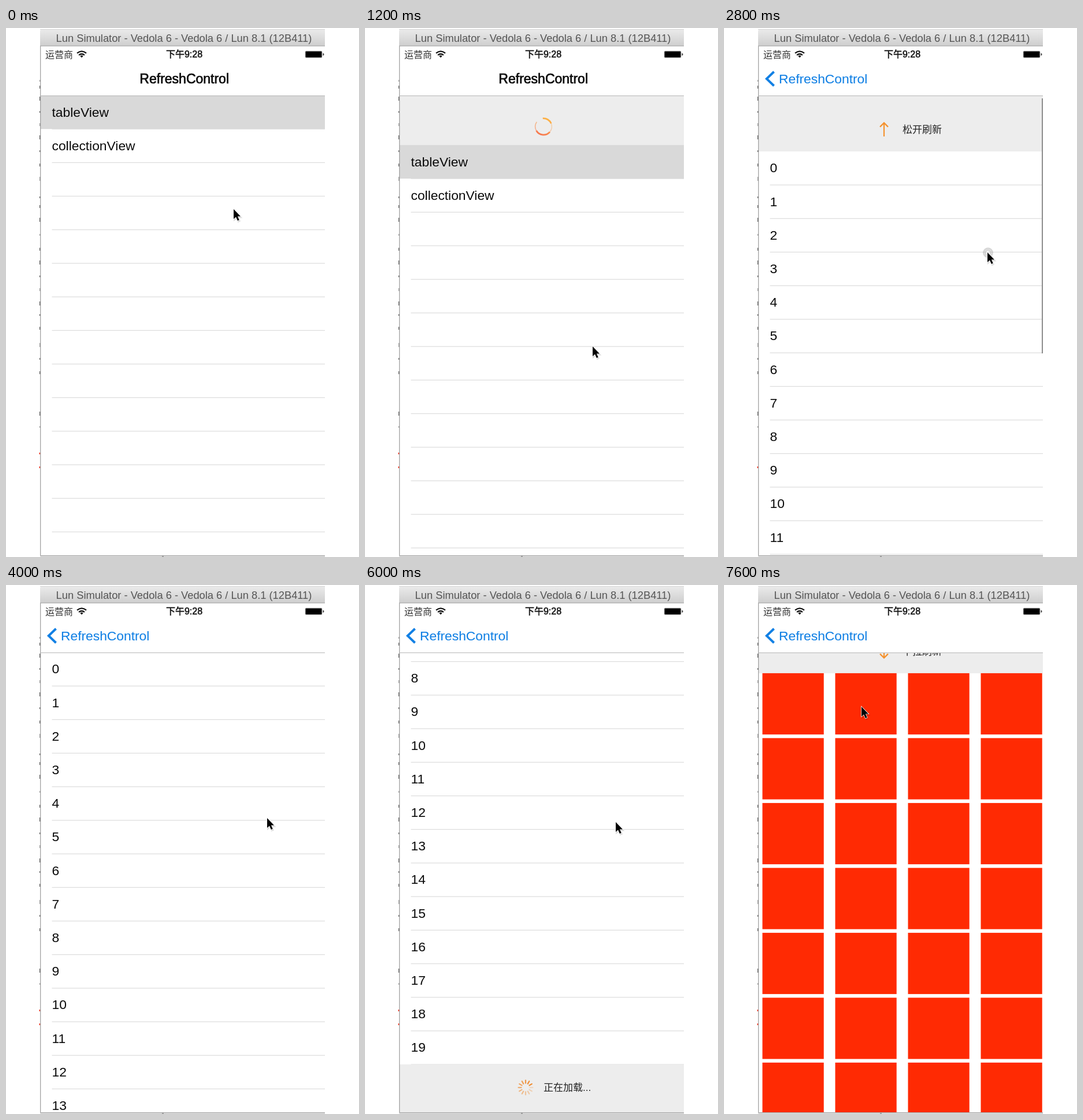
Animation of 611x917 px, one loop 8000 ms. Source, as an HTML page:

```html
<!DOCTYPE html>
<html lang="zh">
<head>
<meta charset="utf-8">
<title>RefreshControl</title>
<style>
html, body { margin: 0; width: 100%; height: 100%; overflow: hidden; background: #fff; }
svg { display: block; width: 100vw; height: 100vh; }
text { font-family: "Liberation Sans", "Noto Sans CJK SC", "Noto Sans CJK", sans-serif; white-space: pre; }
.cell { font-size: 22.8px; fill: #0a0a0a; }
.hint { font-size: 17px; fill: #222; }
</style>
</head>
<body>
<svg viewBox="0 0 611 917" preserveAspectRatio="none">
  <defs>
    <linearGradient id="bar" x2="0" y2="1">
      <stop stop-color="#ebebeb"/><stop offset="1" stop-color="#cecece"/>
    </linearGradient>
    <linearGradient id="flame" gradientUnits="userSpaceOnUse" x1="8" y1="-14" x2="-6" y2="14">
      <stop stop-color="#fdb545"/><stop offset="1" stop-color="#f77850"/>
    </linearGradient>
    <clipPath id="page"><rect x="59.5" y="117.5" width="492.5" height="797"/></clipPath>
  </defs>
  <rect width="611" height="917" fill="#fff"/>
  <g id="edge"></g>
  <g id="body" clip-path="url(#page)"></g>
  <rect x="59" y="31" width="1.3" height="884" fill="#a2a2a2"/>
  <rect x="60" y="914" width="492" height="1.5" fill="#a6a6a6"/>
  <rect x="59" y="915.5" width="493" height="1.5" fill="#d6d6d6"/>
  <rect x="270" y="915" width="3" height="2" fill="#a0a0a0"/>
  <rect x="60.3" y="117" width="491.7" height="1" fill="#b6b6b6"/>
  <path d="M59 31V6q0-4 4-4H552V31Z" fill="url(#bar)"/>
  <rect x="59" y="2" width="493" height="1" fill="#d2d2d2"/>
  <rect x="59" y="30.5" width="493" height="1.2" fill="#a9a9a9"/>
  <text x="308" y="24.3" font-size="18.3" fill="#555" text-anchor="middle">Lun Simulator - Vedola 6 - Vedola 6 / Lun 8.1 (12B411)</text>
  <text x="68" y="51.5" font-size="16" fill="#333">运营商</text>
  <g fill="none" stroke="#111" stroke-width="2.2">
    <path d="M123 43.6Q131 37 139 43.6M126 47Q131 43 136 47"/>
    <path d="M128.3 48.6Q131 46.6 133.7 48.6L131 51.6Z" fill="#111" stroke="none"/>
  </g>
  <text x="308.5" y="51.3" font-size="16" fill="#111" stroke="#111" stroke-width=".5" text-anchor="middle">下午9:28</text>
  <rect x="517.5" y="39.5" width="30" height="12.5" rx="2" fill="#c4c4c4"/>
  <rect x="518.5" y="40.5" width="28" height="10.5" rx="1" fill="#000"/>
  <path d="M548.5 43.5q2 .5 2 2.3t-2 2.3Z" fill="#333"/>
  <g id="nav"></g>
  <g id="pointer"></g>
</svg>
<script>
const STEP = 400, LEFT = 60, TOP = 116.9, ROW = 58.2, WIDTH = 496, GREY = '#ededed';
const $ = id => document.getElementById(id);
const rect = (x, y, w, h, fill) => `<rect x="${x}" y="${y}" width="${w}" height="${h}" fill="${fill}"/>`;
const label = (x, y, s, cls) => `<text x="${x}" y="${y}" class="${cls}">${s}</text>`;
const at = (x, y, s, turn = 0) => `<g transform="translate(${x} ${y}) rotate(${turn})">${s}</g>`;

// y: content shift, push: share of the page still to slide in, at: cursor tip, ring: touch radius
const END = -449.8;
const scenes = [
  { page: 'home', y: 0, at: [394, 314] },
  { page: 'home', y: 108, at: [394, 552], ring: 9, turn: -60 },
  { page: 'home', y: 86, at: [394, 552], turn: 200 },
  { page: 'home', y: 86, at: [394, 552], turn: 0 },
  { page: 'home', y: 0, at: [436, 230] },
  { page: 'table', y: 0, at: [453, 161], ring: 14, push: .2 },
  { page: 'table', y: 0, at: [453, 161], push: .006 },
  { page: 'table', y: 97, at: [456, 389], ring: 9, hint: '松开刷新', icon: 'up', bar: 1 },
  { page: 'table', y: 86, at: [452, 404], hint: '正在刷新...', turn: -90 },
  { page: 'table', y: 86, at: [452, 404], hint: '正在刷新...', turn: 60 },
  { page: 'table', y: 0, at: [452, 404] },
  { page: 'table', y: -395, at: [442, 540], ring: 9, hint: '上拉加载', icon: 'up', bar: 1 },
  { page: 'table', y: -480, at: [436, 450], ring: 9, hint: '松开加载', icon: 'down', bar: 1 },
  { page: 'table', y: -508, at: [434, 411], ring: 9, hint: '松开加载', icon: 'down', bar: 1 },
  { page: 'table', y: END, at: [434, 411], hint: '正在加载...', turn: -120 },
  { page: 'table', y: END, at: [434, 411], hint: '正在加载...', turn: 0 },
  { page: 'table', y: END, at: [434, 411], rows: 40 },
  { page: 'table', y: END, at: [92, 90], rows: 40, ring: 9 },
  { page: 'home', y: 0, at: [238, 206], pick: 1 },
  { page: 'cells', y: 36, at: [238, 211], hint: '下拉刷新', icon: 'down' }
];

function ring() {
  const arc = (a, b, w, o) => {
    const p = t => [Math.cos(t * Math.PI / 180) * 14.3, Math.sin(t * Math.PI / 180) * 14.3].join(' ');
    return `<path d="M${p(a)}A14.3 14.3 0 0 1 ${p(b)}" stroke-width="${w}" opacity="${o}"/>`;
  };
  return `<g fill="none" stroke="url(#flame)">${arc(-95, -22, 2.8, 1)}${arc(-22, 40, 1.5, .4)}` +
    `${arc(40, 150, 2.8, 1)}${arc(150, 215, 1.6, .6)}</g>`;
}

function spokes() {
  let s = '';
  for (let i = 0; i < 12; i++)
    s += `<path d="M0 -7.5V-12.5" transform="rotate(${i * 30})" opacity="${(1 - ((14 - i) % 12) / 14).toFixed(2)}"/>`;
  return `<g stroke="#f08a2c" stroke-width="2.2" stroke-linecap="round">${s}</g>`;
}

const arrow = () => '<path d="M0 12V-11M-7 -4.5L0 -11.5L7 -4.5" fill="none" stroke="#f5922f" stroke-width="2.2"/>';

function hint(s, y) {
  const icon = s.icon ? at(277, y, arrow(), s.icon === 'up' ? 0 : 180) : at(278, y, spokes(), s.turn);
  return icon + label(309, y + 6, s.hint, 'hint');
}

const line = y => rect(79.5, y - .6, WIDTH, 1.2, '#dcdcdc');
const paper = () => rect(LEFT, 117, WIDTH, 800, '#fff');

function home(y, s) {
  const top = TOP + y, pick = s.pick || 0;
  let out = paper();
  if (y > 0) out += rect(LEFT, 117, WIDTH, y, GREY) + at(309, top - 32, ring(), s.turn);
  for (let i = 1; i < 15; i++) out += line(top + ROW * i);
  out += rect(LEFT, top + ROW * pick, WIDTH, ROW, '#d9d9d9');
  return out + ['tableView', 'collectionView'].map((t, i) => label(79.5, top + ROW * i + 37, t, 'cell')).join('');
}

function table(s) {
  const top = TOP + s.y, rows = s.rows || 20, end = top + ROW * rows;
  let out = paper();
  for (let i = 0; i < rows; i++) {
    const y = top + ROW * i;
    if (y < 40 || y > 917) continue;
    out += label(79.5, y + 36.4, i, 'cell') + line(y + ROW);
  }
  if (s.y > 0) out += rect(LEFT, 117, WIDTH, s.y, GREY) + hint(s, top - 38);
  else if (s.hint) out += rect(LEFT, end, WIDTH, 85, GREY) + hint(s, end + 40);
  if (s.bar) {
    const over = Math.max(s.y, -364 - s.y, 0), len = 539 - over;
    const y = s.y > 0 ? 122 : Math.min(122 - s.y * .685, 912 - len);
    out += rect(550, y, 2, len, '#8c8c8c');
  }
  return out;
}

function cells(s) {
  let out = paper() + rect(LEFT, 117, WIDTH, s.y, GREY) + hint(s, TOP + s.y - 38);
  for (let r = 0; r < 7; r++)
    for (let c = 0; c < 4; c++)
      out += rect(66.5 + c * 126, TOP + s.y + r * 112.5, 106.2, 106.2, '#ff2a03');
  return out;
}

function content(s) {
  if (s.page === 'home') return home(s.y, s);
  if (s.page === 'cells') return cells(s);
  if (!s.push) return table(s);
  const away = 1 - s.push;
  return at(-.297 * WIDTH * away, 0, home(0, {})) +
    `<rect x="59" y="117" width="493" height="800" opacity="${.095 * away}"/>` +
    at(WIDTH * s.push, 0, table(s));
}

function nav(s) {
  const name = 'RefreshControl';
  if (s.page === 'home')
    return `<text x="308.7" y="95.7" font-size="23" text-anchor="middle" fill="#0a0a0a" stroke="#0a0a0a" stroke-width=".7">${name}</text>`;
  const p = s.push || 0, faint = p > .1, color = faint ? '#dfe1e3' : '#1280e4';
  return `<g fill="${color}" stroke="${color}" opacity="${p && !faint ? .85 : 1}">` +
    `<path d="M86.5 75.7L73.8 88L86.5 100.3" fill="none" stroke-width="${faint ? 2 : 4}"/>` +
    `<text x="${95 + p * 153}" y="95.7" font-size="22.8" stroke-width="${faint ? .5 : .1}">${name}</text></g>`;
}

function pointer(s) {
  const touch = s.ring ? `<g fill="none" stroke="#a0a0a0" stroke-opacity=".42">
    <circle cx="1" cy=".5" r="${s.ring - 1.5}" stroke-width="3"/><circle cx="1" cy=".5" r="${s.ring / 2}" stroke-width="2.6"/></g>` : '';
  const shape = 'M0 0V17L4 13.4L6.9 20L9.7 18.8L6.9 12.4H12Z';
  return at(s.at[0], s.at[1], touch + `<path d="${shape}" transform="translate(1 2)" opacity=".13" stroke="#000" stroke-width="2"/>` +
    `<path d="${shape}" stroke="#fff" stroke-width="1.4" paint-order="stroke"/>`);
}

// Sliver of the window behind
function edge(step) {
  const dark = [92, 103, 123, 146, 168, 190, 214, 238, 262, 294, 310, 333, 359, 384, 407, 431, 454, 478, 498, 521, 550, 574, 598, 669, 692];
  const hidden = step === 7 || step === 8;
  return dark.map((y, i) => rect(58, y - 2 - i % 3, 1.5, 3 + i % 3 * 2, i % 4 ? '#555' : '#999')).join('') +
    (hidden ? '' : rect(57.5, 736, 2.5, 3, '#f43b28')) + rect(57.5, 760, 2.5, 3, '#f43b28');
}

const start = performance.now();
let shown = -1;
function draw() {
  const step = Math.floor(Math.max(0, performance.now() - start) / STEP) % scenes.length;
  if (step !== shown) {
    const s = scenes[shown = step];
    $('edge').innerHTML = edge(step);
    $('body').innerHTML = content(s);
    $('nav').innerHTML = nav(s);
    $('pointer').innerHTML = pointer(s);
  }
  requestAnimationFrame(draw);
}
draw();
</script>
</body>
</html>
```
